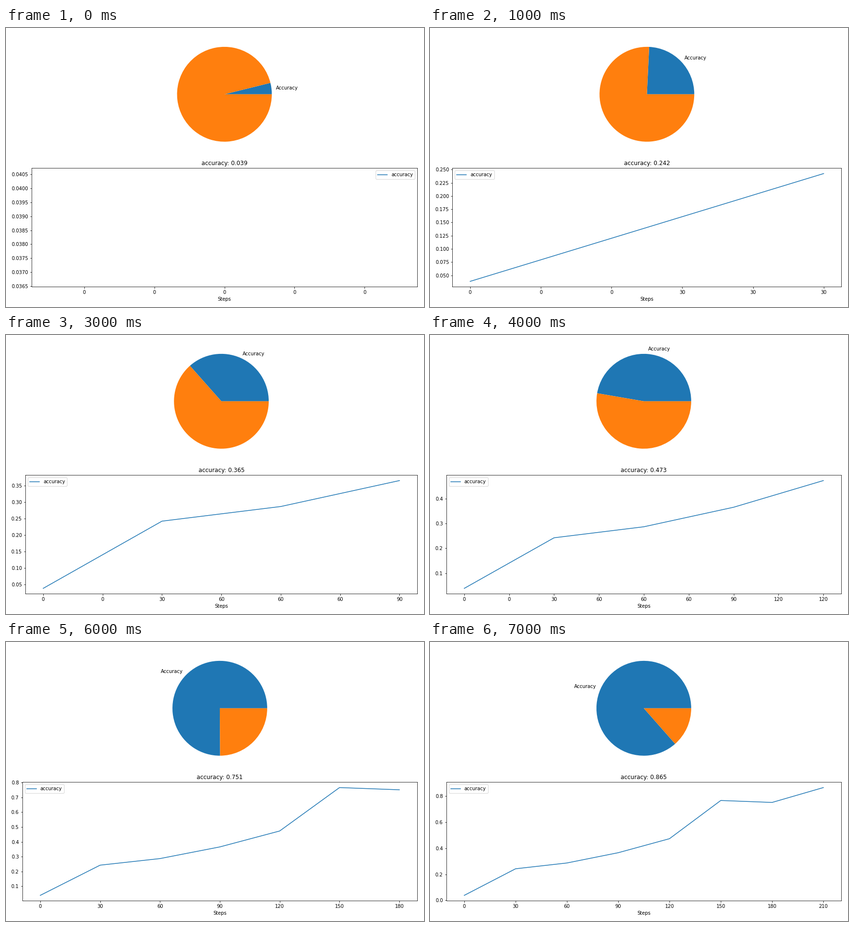
Write a matplotlib script that moves like this. It is 864x576 px and loops after 8 s.

```python
import matplotlib.pyplot as plt
from matplotlib.animation import FuncAnimation
from matplotlib.ticker import FuncFormatter

W, H, DPI = 864, 576, 72
RIGHT, BOTTOM, PANEL_H = 850.2, 41.8, 244.8
PIE_BOTTOM = H - 14.4 - PANEL_H

STEPS = [30 * k for k in range(8)]
ACCURACY = [0.0386, 0.2424, 0.2868, 0.3655, 0.473, 0.766, 0.751, 0.865]
DECIMALS = [4, 3, 2, 2, 1, 1, 1, 1]  # digits on the y tick labels

fig = plt.figure(figsize=(W / DPI, H / DPI), dpi=DPI, facecolor="white")
pie_ax = fig.add_axes([0, 0.5, 1, 0.4])
line_ax = fig.add_axes([0, 0.1, 1, 0.4])


def place(ax, left, bottom):
    ax.set_position([left / W, bottom / H, (RIGHT - left) / W, PANEL_H / H])


def step_label(count):
    def label(x, pos=None):
        index = min(max(round(x), 0), count - 1)
        return str(STEPS[index])
    return FuncFormatter(label)


def draw(k):
    count = k + 1
    value = ACCURACY[k]
    left = 21 + 6.36 * (DECIMALS[k] + 1)  # room for the tick labels

    pie_ax.clear()
    place(pie_ax, left, PIE_BOTTOM)
    pie_ax.pie([value, 1 - value], labels=["Accuracy", ""])

    line_ax.clear()
    place(line_ax, left, BOTTOM)
    line_ax.plot(range(count), ACCURACY[:count], label="accuracy")
    line_ax.xaxis.set_major_formatter(step_label(count))
    line_ax.set_title(f"accuracy: {value:.3f}")
    line_ax.set_xlabel("Steps")
    line_ax.legend(loc="upper left" if k else "upper right")
    return []


anim = FuncAnimation(fig, draw, frames=len(STEPS), init_func=lambda: draw(0),
                     interval=1000, repeat=True, repeat_delay=0, blit=False)
plt.show()
```
